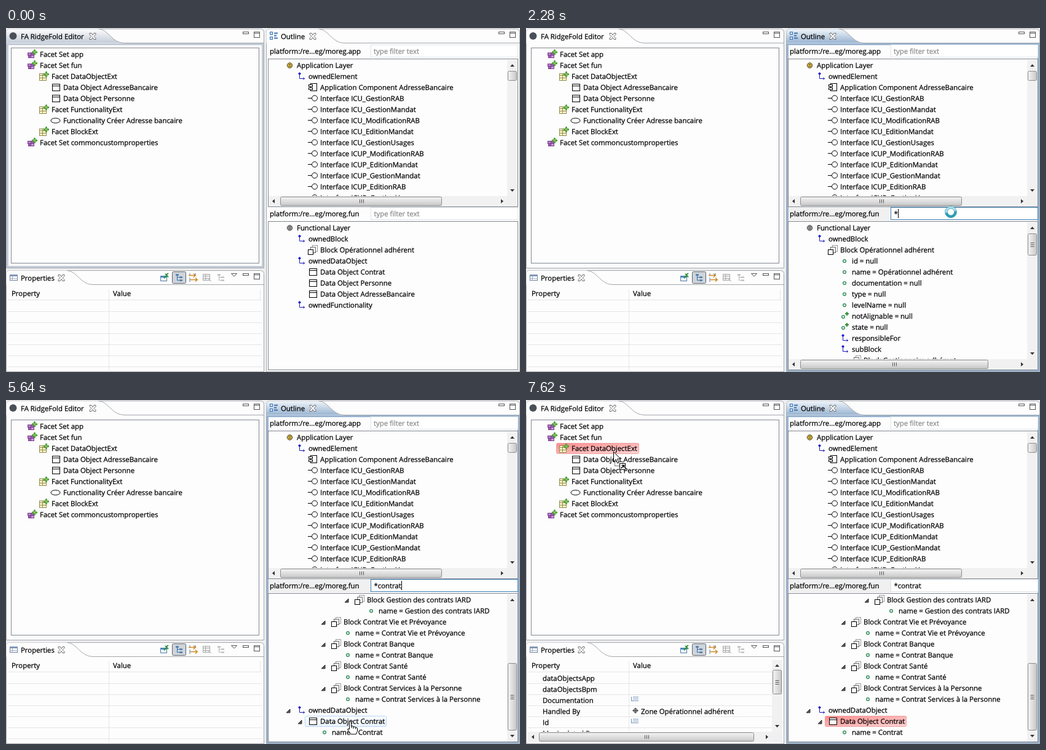
Write an HTML page that moves like this. It is 836 px wide and 561 px high and loops after 8000 ms.

```html
<!DOCTYPE html>
<html lang="fr">
<head>
<meta charset="utf-8">
<title>Outline filter</title>
<style>
html, body { margin: 0; width: 836px; height: 561px; overflow: hidden; background: #f0f0f0; }
svg { display: block; }
text { font: 11.4px "Open Sans", "Noto Sans", sans-serif; text-rendering: geometricPrecision; white-space: pre; stroke-width: .25px; }
</style>
</head>
<body>
<svg id="stage" width="836" height="561" viewBox="0 0 836 561">
  <defs>
    <linearGradient id="idle" x2="0" y2="1"><stop stop-color="#fdfdfd"/><stop offset="1" stop-color="#c3ccd8"/></linearGradient>
    <linearGradient id="live" x2="0" y2="1"><stop stop-color="#f0f5fa"/><stop offset="1" stop-color="#99b4d1"/></linearGradient>
    <linearGradient id="thumbV"><stop stop-color="#f4f4f4"/><stop offset="1" stop-color="#c8c8c8"/></linearGradient>
    <linearGradient id="thumbH" x2="0" y2="1"><stop stop-color="#f4f4f4"/><stop offset="1" stop-color="#c8c8c8"/></linearGradient>
    <linearGradient id="picked" y2="1"><stop stop-color="#fb8c8c"/><stop offset="1" stop-color="#ffd6d6"/></linearGradient>
    <linearGradient id="hover" x2="0" y2="1"><stop stop-color="#fcfdff"/><stop offset="1" stop-color="#ebf3fd"/></linearGradient>
  </defs>
  <g id="scene"></g>
</svg>
<script>
const LOOP = 8000, PAPER = '#fdfdfd';
const pen = document.createElement('canvas').getContext('2d');
const textWidth = s => {
  pen.font = '11.4px "Open Sans", "Noto Sans", sans-serif';
  return pen.measureText(s).width;
};

// Basic shapes
const rect = (x, y, w, h, fill = 'none', stroke = 'none', more = '') =>
  `<rect x="${x}" y="${y}" width="${w}" height="${h}" fill="${fill}" stroke="${stroke}" ${more}/>`;
const path = (d, stroke = '#000', fill = 'none', w = 1) =>
  `<path d="${d}" fill="${fill}" stroke="${stroke}" stroke-width="${w}"/>`;
const circle = (x, y, r, fill, stroke = 'none', w = 1) =>
  `<circle cx="${x}" cy="${y}" r="${r}" fill="${fill}" stroke="${stroke}" stroke-width="${w}"/>`;
const text = (x, y, s, fill = '#000') => `<text x="${x}" y="${y + 4}" fill="${fill}" stroke="${fill}">${s}</text>`;
const at = (x, y, body) => `<g transform="translate(${x} ${y})">${body}</g>`;
const clip = (x, y, w, h, body) =>
  `<svg x="${x}" y="${y}" width="${w}" height="${h}" viewBox="${x} ${y} ${w} ${h}">${body}</svg>`;

// Icons, drawn around 0,0
const plus = path('M2.5-7.5h2v3h3v2h-3v3h-2v-3h-3v-2h3z', '#3c8a2a', '#8fd35c');
const layer = c => circle(.5, 0, 4.2, c, '#333') + path('M-2-1.5h5M-2 1.5h5M-.5-3v6M2-3v6', '#444', 'none', .6);
const attr = circle(0, 0, 2.4, '#d5efdf', '#2f8558', 1.3);
const icons = {
  set: rect(-7.5, -2.5, 5, 4, '#b57fc4', '#7c3f91') + rect(-2.5, -2.5, 5, 4, '#9a5bb0', '#7c3f91') +
    rect(-6.5, 1.5, 4, 4, '#9a5bb0', '#7c3f91') + rect(-2.5, 1.5, 5, 4, '#c79bd3', '#7c3f91') + plus,
  facet: rect(-7.5, -4.5, 11, 11, '#fff6c4', '#8d8a55') + path('M-7.5-1.5h11M-7.5 2.5h11M-2.5-4.5v11', '#8d8a55') + plus,
  object: rect(-5.5, -5.5, 12, 11, '#fff', '#000') + path('M-5.5-2.5h12'),
  func: '<ellipse cx="-.5" rx="7.5" ry="4" fill="#fff" stroke="#000"/>',
  app: layer('#f5c832'),
  fun: layer('#aaa'),
  owned: path('M-2.5-4V3.5H5.5M3.5 1.5l2 2-2 2', '#1c1cb8') + path('M-2.5-7l2.5 2.5-2.5 2.5-2.5-2.5z', 'none', '#1c1cd0'),
  comp: rect(-3.5, -6.5, 10, 12, '#fff', '#000') + rect(-6.5, -4.5, 6, 3, '#fff', '#000') + rect(-6.5, .5, 6, 3, '#fff', '#000'),
  iface: path('M-8-.5h6') + circle(3, -.5, 4.5, '#fff', '#000'),
  block: rect(-.5, -7.5, 8, 10, '#fff', '#999') + rect(-3.5, -4.5, 8, 9, '#fff', '#666') + rect(-7.5, -.5, 8, 8, '#fff', '#000'),
  attr,
  attrPlus: at(-2, 1, attr) + path('M4-7v6M1-4h6', '#2f8b2f', 'none', 2),
};
const row = (x, y, icon, label, arrow) =>
  (arrow ? path(`M${x - 30} ${y - 2}v6h-6z`, '#333', '#555') : '') +
  at(x - 12, y, icons[icon]) + text(x, y, label);
const glow = (x, y, label, fill, stroke) =>
  rect(x - 24.5, y - 8.5, Math.round(textWidth(label)) + 27, 17, `url(#${fill})`, stroke, 'rx="2"');

// Window parts
const closeMark = (x, y) => path(`M${x - 5} ${y - 5}h3l2 3 2-3h3v2l-3 3 3 3v2h-3l-2-3-2 3h-3v-2l3-3-3-3z`, '#666', '#fff');
const minMax = (x, y) => rect(x - 4.5, y - 1.5, 9, 3, '#fff', '#555') +
  rect(x + 13.5, y - 1.5, 9, 9, '#fff', '#555') + path(`M${x + 13.5} ${y + .5}h9`, '#555');
function panel(x, y, w, h, curve, title, tabFill, frame) {
  const base = y + 23, top = `M${x} ${base}V${y + 6}q0-6 6-6`;
  return path(`${top}H${x + w - 6}q6 0 6 6V${y + h}H${x}z`, '#a3a7ad', PAPER) +
    (frame ? rect(x + 2, base + 2, w - 4, h - 27, 'none', frame, 'stroke-width="3"') : '') +
    path(`${top}H${curve}C${curve + 16} ${y} ${curve + 22} ${base} ${curve + 42} ${base}z`, 'none', tabFill) +
    path(`M${curve} ${y}C${curve + 16} ${y} ${curve + 22} ${base} ${curve + 42} ${base}H${x + w}`, '#a3a7ad') +
    text(x + 23.5, y + 12, title) + closeMark(curve - 9, y + 12);
}
const grip = (x, y, d) => [-3, 0, 3].map(o => path(d ? `M${x - 3} ${y + o}h6` : `M${x + o} ${y - 3}v6`, '#555')).join('');
const vbar = (x, y, h, pos, len) => rect(x, y, 17, h, '#f1f1f1') +
  path(`M${x + 5} ${y + 11}l3.5-4 3.5 4z`, 'none', '#333') + path(`M${x + 5} ${y + h - 11}l3.5 4 3.5-4z`, 'none', '#333') +
  rect(x + 1.5, pos + .5, 14, len - 1, 'url(#thumbV)', '#8b8b8b', 'rx="2"') +
  (len > 20 ? grip(x + 8.5, Math.round(pos + len / 2) + .5, true) : '');
const hbar = (x, y, w, pos, len) => rect(x, y, w, 17, '#f1f1f1') +
  path(`M${x + 10} ${y + 5}l-4 3.5 4 3.5z`, 'none', '#333') + path(`M${x + w - 10} ${y + 5}l4 3.5-4 3.5z`, 'none', '#333') +
  rect(pos + .5, y + 1.5, len - 1, 14, 'url(#thumbH)', '#8b8b8b', 'rx="2"') +
  grip(Math.round(pos + len / 2) + .5, y + 8.5, false);
const filterBox = (y, active) => rect(593.5, y + .5, 239, 20, '#fff', active ? '#3c7fb1' : '#e0e3e8');

// Left editor
const editorRows = [
  [55, 'set', 'Facet Set app'], [55, 'set', 'Facet Set fun'], [74, 'facet', 'Facet DataObjectExt'],
  [93, 'object', 'Data Object AdresseBancaire'], [93, 'object', 'Data Object Personne'],
  [74, 'facet', 'Facet FunctionalityExt'], [93, 'func', 'Functionality Créer Adresse bancaire'],
  [74, 'facet', 'Facet BlockExt'], [55, 'set', 'Facet Set commoncustomproperties'],
];
const list = (rows, y, arrows) => rows.map(([x, icon, label], i) =>
  row(x, y + 18 * i, icon, label, arrows && icon !== 'attr')).join('');
const editor = (focus, drop) =>
  panel(.5, 1.5, 419, 390, 150, 'FA RidgeFold Editor', focus ? 'url(#idle)' : PAPER, focus && '#c3ccd8') +
  circle(11.5, 13, 6, '#4a5058') + minMax(390, 8) +
  rect(8.5, 32.5, 403, 351, PAPER, '#828790') +
  (drop ? glow(74, 79, 'Facet DataObjectExt', 'picked', '#f0a0a0') : '') + list(editorRows, 43);

// Properties
const tool = (x, c, body) => at(x, 407, `<g stroke="${c}" fill="none">${body}</g>`);
const treeMark = '<path d="M-3.5-4.5v9M-3.5-.5h3M-3.5 4.5h3"/><path d="M-6-4.5h5M0-.5h5M0 4.5h5" stroke-width="2"/>';
const noteIcon = y => path(`M171.5 ${y - 4}v7M174 ${y - 3.5}h9M174 ${y - .5}h9M172 ${y + 2.5}h11`, '#6d93b8');
const propsFrame = panel(.5, 395.5, 419, 165, 99, 'Properties', PAPER) +
  rect(6.5, 402.5, 12, 9, '#fff', '#6a7f9c') + rect(6, 402, 13, 3, '#7f96b5') + path('M6 408.5h13M10.5 405v7', '#9fb0c6') +
  tool(257, '#5b7fa6', rect(-5.5, -2.5, 10, 8, '#eaf3fb', '#5b7fa6') + rect(-6, -3, 11, 3, '#4f86c0') +
    path('M0 1l4-4m-2-3l5 5M4-5l3-2', '#35913d', 'none', 2)) +
  rect(270.5, 397.5, 22, 19, '#cfd4da', '#5f646b', 'rx="2"') + tool(282, '#2e6da4', treeMark) +
  tool(304, '#d08a24', path('M-7-3.5h11l-3-3m3 3l-3 3M-4 3.5h11l-3-3m3 3l-3 3', '#d08a24', 'none', 1.5) +
    path('M-5-7v3M-5 0v7M4-7v3', '#4773a8')) +
  tool(327, '#aaa', rect(-6.5, -5.5, 11, 10, '#f4f4f4', '#aaa') + path('M-6.5-2.5h11M-6.5 1.5h11M-2.5-5v9M2 2l5 4', '#aaa')) +
  tool(350, '#b5b5b5', treeMark) + path('M366.5 400.5h9l-4.5 4.5z', '#555', '#fff') + minMax(390, 402) +
  text(9, 433, 'Property') + text(174, 433, 'Value') +
  path('M3 443.5h413M167.5 426v133M413.5 426v18' + [0, 1, 2, 3, 4, 5].map(i => `M3 ${462.5 + 18 * i}h413`).join(''), '#e6e6e6');
const propsRows = clip(2, 420, 416, 121,
    ['dataObjectsApp', 'dataObjectsBpm', 'Documentation', 'Handled By', 'Id', 'Manipulated By']
      .map((s, i) => text(27, 454 + 18 * i, s)).join('') +
    noteIcon(488) + noteIcon(524) + path('M178 502l4.5 4.5-4.5 4.5-4.5-4.5z', '#777', '#999') +
    path('M178 502v9M173.5 506.5h9', '#444') + text(187, 508, 'Zone Opérationnel adhérent')) +
  vbar(400, 424, 117, 440, 40) + hbar(3, 541, 397, 21, 350) + rect(400, 541, 17, 17, '#f0f0f0');

// Right outline
const appRows = [[473, 'app', 'Application Layer'], [492, 'owned', 'ownedElement'],
  [511, 'comp', 'Application Component AdresseBancaire'],
  ...['ICU_GestionRAB', 'ICU_GestionMandat', 'ICU_ModificationRAB', 'ICU_EditionMandat', 'ICU_GestionUsages',
    'ICUP_ModificationRAB', 'ICUP_EditionMandat', 'ICUP_GestionMandat', 'ICUP_EditionRAB', 'ICUP_GestionUsages']
    .map(s => [511, 'iface', 'Interface ' + s])];
const root = [473, 'fun', 'Functional Layer'];
const mainBlock = [[492, 'owned', 'ownedBlock'], [511, 'block', 'Block Opérationnel adhérent']];
const briefRows = [root, ...mainBlock, [492, 'owned', 'ownedDataObject'],
  ...['Contrat', 'Personne', 'AdresseBancaire'].map(s => [511, 'object', 'Data Object ' + s]),
  [492, 'owned', 'ownedFunctionality']];
const fullRows = [root, ...mainBlock,
  ...['id = null', 'name = Opérationnel adhérent', 'documentation = null', 'type = null', 'levelName = null'].map(s => [530, 'attr', s]),
  [530, 'attrPlus', 'notAlignable = null'], [530, 'attrPlus', 'state = null'],
  [530, 'owned', 'responsibleFor'], [530, 'owned', 'subBlock'], [549, 'block', 'Block Gestionnaire adhérent']];
const named = (x, kind, prefix, name) => [[x, kind, prefix + name], [x + 19, 'attr', 'name = ' + name]];
const foundRows = [...named(587, 'block', 'Block ', 'Gestion des contrats IARD'),
  ...['Vie et Prévoyance', 'Banque', 'Santé', 'Services à la Personne'].flatMap(s => named(549, 'block', 'Block ', 'Contrat ' + s)),
  [492, 'owned', 'ownedDataObject'], ...named(511, 'object', 'Data Object ', 'Contrat')];

const appTree = text(429, 38, 'platform:/re...eg/moreg.app') + filterBox(27) + text(598, 38, 'type filter text', '#8a8a8a') +
  rect(426.5, 50.5, 406, 241, PAPER, '#828790') + clip(427, 51, 388, 223, list(appRows, 61)) +
  vbar(815, 52, 222, 70, 16) + hbar(427, 274, 388, 446, 263) + rect(815, 274, 17, 17, '#f0f0f0');
const outlineIcon = rect(429.5, 6.5, 4, 4, '#cfe2f7', '#3a70b0') + rect(429.5, 14.5, 4, 4, '#cfe2f7', '#3a70b0') +
  path('M436 8.5h6M436 12.5h4M436 16.5h6', '#3a70b0', 'none', 2);

function funTree(t, cursor) {
  if (t < 1290) return list(briefRows, 326);
  if (t < 2020) return (t < 1450 ? path('M438.5 323.5v7l4-3.5z', '#ddd') : '') + list([root], 326);
  if (t < 4010) {
    const len = Math.max(16, 60 - 12 * Math.floor((t - 2020) / 130));
    return clip(427, 316, 388, 224, list(fullRows, 326)) +
      vbar(815, 317, 223, 335, len) + hbar(427, 540, 388, 446, 306) + rect(815, 540, 17, 17, '#f0f0f0');
  }
  const picked = t >= 5920;
  const index = picked ? 11 : cursor.kind === 'hand' ? Math.floor((cursor.y - 317) / 18) : -1;
  const hit = foundRows[index];
  const over = hit && (picked || cursor.x < hit[0] + textWidth(hit[2]));
  return (over ? glow(hit[0], 326 + 18 * index, hit[2], picked ? 'picked' : 'hover', picked ? '#f0a0a0' : '#b8d6fb') : '') +
    list(foundRows, 326, t >= 4570) + vbar(815, 317, 240, 429, 110);
}

const within = (t, ...spans) => spans.some(([a, b]) => t >= a && t < b);
function outline(t, cursor) {
  const active = t >= 1020;
  const typed = t < 1750 ? '' : t < 3210 ? '*' : t < 3330 ? '*cont' : t < 3610 ? '*contra' : '*contrat';
  const caret = within(t, [1170, 1450], [1750, 4160], [4700, 5230], [5640, 5920]);
  const caretX = Math.round(598.5 + textWidth(typed)) + .5;
  return panel(423.5, 1.5, 412, 559, 508, 'Outline', active ? 'url(#live)' : PAPER, active && '#99b4d1') +
    outlineIcon + minMax(806, 8) + appTree +
    (active ? rect(427, 292, 166, 22, '#f0f0f0') : '') +
    text(429, 303, 'platform:/re...eg/moreg.fun') + filterBox(292, active && t < 5920) +
    text(598.5, 303, active ? typed : 'type filter text', active ? '#000' : '#8a8a8a') +
    (caret ? path(`M${caretX} 295v15`) : '') +
    rect(426.5, 315.5, 406, 242, PAPER, '#828790') + funTree(t, cursor);
}

// Pointer: start, end, steps, shape, from x,y to x,y
const moves = [
  [150, 1170, 8, 'arrow', 250, 230, 693, 301],
  [1750, 1751, 2, 'none', 693, 301, 693, 301],
  [2020, 3210, 10, 'busy', 691, 300, 691, 300],
  [3210, 3211, 2, 'none', 693, 301, 693, 301],
  [4570, 4830, 3, 'hand', 693, 301, 661, 457],
  [4830, 5490, 6, 'hand', 661, 457, 560, 524],
  [5920, 6510, 5, 'stop', 560, 524, 239, 216],
  [6510, 6940, 4, 'stop', 239, 216, 239, 133],
  [6940, 7620, 6, 'stop', 239, 133, 142, 84],
];
function pointer(t) {
  const move = moves.findLast(m => t >= m[0]);
  if (!move) return { kind: 'none', x: 0, y: 0 };
  let [start, end, steps, kind, x0, y0, x1, y1] = move;
  const p = Math.floor(Math.min(1, (t - start) / (end - start)) * (steps - 1) + 1e-6) / (steps - 1);
  const e = start === 6940 ? 1 - (1 - p) ** 2 : p;
  const x = Math.round(x0 + (x1 - x0) * e), y = Math.round(y0 + (y1 - y0) * e);
  if (x > 593 && y > 292 && y < 314 && (kind === 'hand' || kind === 'arrow')) kind = 'beam';
  if (kind === 'stop' && y < 88) kind = 'link';
  return { kind, x, y, spin: p * 720 };
}
const arrow = path('M.5.5v16l3.7-3.5 2.6 6 2.4-1-2.6-6h5z', '#000', '#fff');
const shapes = {
  none: () => '',
  arrow: () => arrow,
  beam: () => path('M-3-7.5h2.5l1 1 1-1H4M-3 7.5h2.5l1-1 1 1H4M.5-7V7'),
  busy: c => circle(0, 0, 7.5, '#fff', '#a9dce6', 4) +
    `<g transform="rotate(${c.spin})">${path('M0-7.5A7.5 7.5 0 0 1 0 7.5', '#2b9bb3', 'none', 4)}</g>` +
    circle(0, 0, 9.5, 'none', '#4fa9ba', .8) + circle(0, 0, 5.5, 'none', '#4fa9ba', .8),
  hand: () => path('M-1.5 2q0-2 1.5-2t1.5 2v6q3-1.5 3.5 1 3-1 3.5 1 3-.5 3 2v4l-2 5H1l-5-7q-1-3 2.5-1z', '#000', '#fff') +
    path('M2 8v3M5 9v3M8.5 10v2.5'),
  stop: () => circle(0, 0, 7.6, '#fff', '#000', 2.5) + path('M-5.5-5.5l11 11', '#000', 'none', 2.5),
  link: () => rect(2.5, 16.5, 13, 7, 'none', '#000', 'stroke-dasharray="1 1"') + arrow +
    rect(10.5, 19.5, 9, 10, '#fff', '#000') + path('M12.5 27.5l4.5-4.5M13.5 22.5h4v4', '#000', 'none', 1.5),
};

const scene = document.getElementById('scene');
let last = '';
function frame() {
  const t = performance.now() % LOOP, cursor = pointer(t);
  const markup = editor(t < 1020, cursor.kind === 'link') + propsFrame + (t >= 6060 ? propsRows : '') +
    outline(t, cursor) + at(cursor.x, cursor.y, shapes[cursor.kind](cursor));
  if (markup !== last) scene.innerHTML = last = markup;
  requestAnimationFrame(frame);
}
frame();
</script>
</body>
</html>
```
